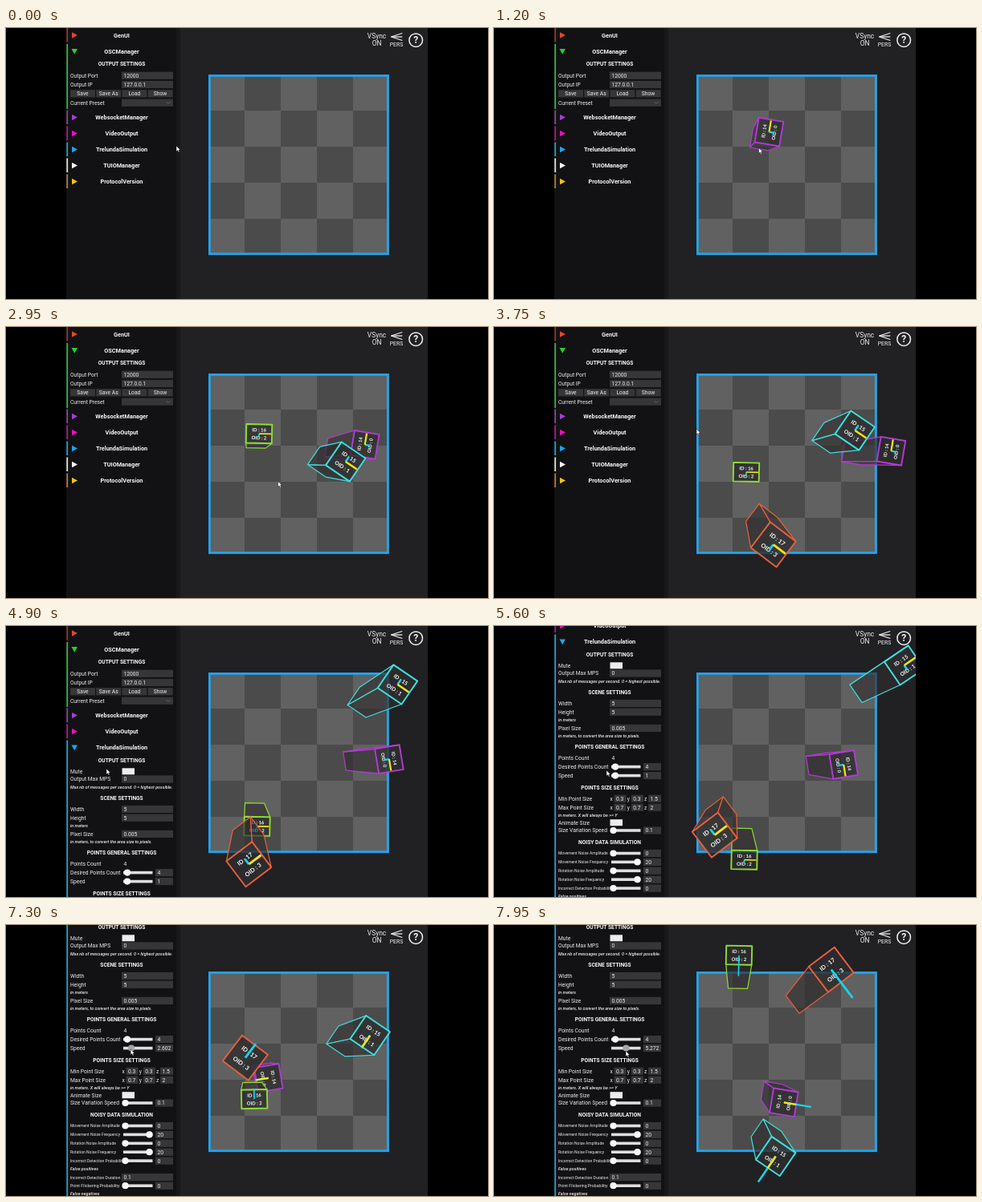
Animation of 600 by 338 pixels, one loop 8000 ms. Source, as an HTML page with a canvas:

```html
<!DOCTYPE html>
<html lang="en">
<head>
<meta charset="utf-8">
<title>Point simulation</title>
<style>
html, body { margin: 0; width: 100%; height: 100%; overflow: hidden; background: #000; }
canvas { display: block; width: 600px; height: 338px; }
</style>
</head>
<body>
<canvas id="stage" width="600" height="338"></canvas>
<script>
const ctx = document.getElementById('stage').getContext('2d');
const LOOP = 8000, STEP = 50;
const EYE = { x: 300, y: 169 };
const BOARD = { left: 252, top: 59.3, right: 477, bottom: 283 };
const OPEN_AT = 4400, GRAB_AT = 7.05;
const DRAG = { start: 7.15, length: 0.4, gain: 4.272 };
const SCROLLS = [5100, 5200, 5300, 5400, 5750], NOTCH = 33;
const UI = 'Roboto, sans-serif';

// x, y: ground position at time `at` (s); lift: perspective scale of the top face
const boxes = [
  { id: 14, oid: 0, color: '#b23bd2', born: 1000, at: 2.05, x: 370, y: 145.7, vx: 44.8, vy: 7.4, w: 31, h: 31, lift: 1.33, turns: true },
  { id: 15, oid: 1, color: '#3fe0dc', born: 1800, at: 2.05, x: 371.5, y: 202, vx: 25.5, vy: -37.5, w: 36, h: 35, lift: 1.3, turns: true },
  { id: 16, oid: 2, color: '#8fdc35', born: 2570, at: 3.75, x: 310.5, y: 178, vx: -1, vy: 45, w: 32, h: 23.5, lift: 1.33 },
  { id: 17, oid: 3, color: '#e9603c', born: 3150, at: 3.75, x: 332.9, y: 239.6, vx: -27.2, vy: 36, w: 40, h: 40, lift: 1.45 }
];

// time, x, y of the pointer tip
const pointerKeys = [
  [0, 212, 147], [50, 212, 147], [550, 323, 138], [1000, 323, 138], [1800, 365, 211],
  [2050, 340, 183], [2570, 311, 125], [3150, 349, 218], [3750, 252, 127], [4250, 86, 151],
  [4400, 86, 151], [4900, 125, 178], [5600, 140, 180], [6550, 170, 162], [7050, 151, 154],
  [7150, 151, 154], [7550, 164, 157], [8000, 164, 157]
];

const clamp = v => Math.max(0, Math.min(1, v));
const dragPhase = s => clamp((s - DRAG.start) / DRAG.length);
const speedAt = s => 1 + DRAG.gain * dragPhase(s);

function travelTime(s) {
  const u = dragPhase(s);
  const after = Math.max(0, s - DRAG.start - DRAG.length);
  return s + DRAG.gain * (DRAG.length * u * u / 2 + after);
}

function bounce(value, lo, hi) {
  const span = hi - lo, period = 2 * span;
  const m = ((value - lo) % period + period) % period;
  return m < span ? [lo + m, 1] : [lo + period - m, -1];
}

function pointerAt(t) {
  const i = pointerKeys.findIndex(k => k[0] > t);
  const [t0, x0, y0] = pointerKeys[i - 1], [t1, x1, y1] = pointerKeys[i];
  const u = (t - t0) / (t1 - t0), e = u * u * (3 - 2 * u);
  return [x0 + (x1 - x0) * e, y0 + (y1 - y0) * e];
}

function rect(x, y, w, h, color) {
  ctx.fillStyle = color;
  ctx.fillRect(x, y, w, h);
}

function line(x0, y0, x1, y1, color, width) {
  ctx.strokeStyle = color;
  ctx.lineWidth = width;
  ctx.beginPath();
  ctx.moveTo(x0, y0);
  ctx.lineTo(x1, y1);
  ctx.stroke();
}

function polygon(points) {
  ctx.beginPath();
  points.forEach(([x, y]) => ctx.lineTo(x, y));
  ctx.closePath();
}

function face(points, fill, stroke, width) {
  polygon(points);
  ctx.fillStyle = fill;
  ctx.fill();
  ctx.strokeStyle = stroke;
  ctx.lineWidth = width;
  ctx.stroke();
}

function disc(x, y, r, color) {
  ctx.fillStyle = color;
  ctx.beginPath();
  ctx.arc(x, y, r, 0, 7);
  ctx.fill();
}

function text(str, x, y, font, align = 'left', color = '#efefef') {
  ctx.font = font;
  ctx.textAlign = align;
  ctx.textBaseline = 'middle';
  ctx.fillStyle = color;
  ctx.fillText(str, x, y + 0.5);
}

function drawBoard() {
  for (let i = 0; i < 25; i++) {
    rect(252 + (i % 5) * 45, 58 + Math.floor(i / 5) * 45, 45, 45, i % 2 ? '#4b4b4b' : '#616161');
  }
  ctx.strokeStyle = '#1ea5f0';
  ctx.lineWidth = 2.8;
  ctx.strokeRect(253.4, 59.5, 221.9, 222.2);
}

function drawBox(b, s) {
  const run = travelTime(s) - b.at;
  const insetX = b.w / 2 / b.lift, insetY = b.h / 2 / b.lift;
  const [gx, sx] = bounce(b.x + b.vx * run, BOARD.left + insetX, BOARD.right - insetX);
  const [gy, sy] = bounce(b.y + b.vy * run, BOARD.top + insetY, BOARD.bottom - insetY);
  const cx = EYE.x + (gx - EYE.x) * b.lift, cy = EYE.y + (gy - EYE.y) * b.lift;
  const heading = Math.atan2(b.vy * sy, b.vx * sx);
  const forward = heading > 0 ? 1 : -1;
  const angle = heading - forward * Math.PI / 2;
  const cos = Math.cos(angle), sin = Math.sin(angle);

  const top = [[-1, -1], [1, -1], [1, 1], [-1, 1]].map(([u, v]) => {
    const x = u * b.w / 2, y = v * b.h / 2;
    return [cx + x * cos - y * sin, cy + x * sin + y * cos];
  });
  const base = top.map(([x, y]) => [EYE.x + (x - EYE.x) / b.lift, EYE.y + (y - EYE.y) / b.lift]);

  ctx.lineJoin = 'round';
  top.forEach((p, i) => {
    const j = (i + 1) % 4, q = top[j];
    const side = (q[0] - p[0]) * (EYE.y - p[1]) - (q[1] - p[1]) * (EYE.x - p[0]);
    if (side < 0) face([p, q, base[j], base[i]], 'rgba(48,45,46,.65)', b.color, 1.2);
  });
  face(top, 'rgba(45,45,47,.8)', b.color, 1.9);

  const speed = speedAt(s), fast = speed > 1;
  const reach = b.h * 0.21 * speed, thick = b.h / 14;
  const font = `bold ${b.w * 0.185}px Lato, sans-serif`;
  ctx.save();
  ctx.translate(cx, cy);
  ctx.rotate(angle);
  text(`ID : ${b.id}`, 0, -b.h * 0.21, font, 'center', '#fff');
  text(`OID : ${b.oid}`, 0, b.h * 0.21, font, 'center', '#fff');
  line(0, 0, 0, forward * reach, '#19d3ee', thick);
  if (!fast) line(0, 0, b.w / 2 - 1, 0, '#f5e414', thick);
  else if (b.turns) line(0, 0, 0, forward * b.w / 2, '#f5e414', thick);
  ctx.restore();
}

function drawCorner() {
  text('VSync', 461.5, 10.5, `8.4px ${UI}`, 'center');
  text('ON', 461.5, 19, `8.4px ${UI}`, 'center');
  text('PERS', 486, 20, `6.9px ${UI}`, 'center');
  for (const y of [6.5, 11, 15.5]) line(479.5, 11, 493.3, y, '#efefef', 1.3);
  ctx.strokeStyle = '#efefef';
  ctx.lineWidth = 1.5;
  ctx.beginPath();
  ctx.arc(510.2, 15.2, 8.3, 0, 7);
  ctx.stroke();
  text('?', 510.2, 15.2, `bold 12px ${UI}`, 'center');
}

const label = (str, y, size = 6.7) => text(str, 80, y, `${size}px ${UI}`);
const title = (str, y) => text(str, 144, y, `bold 6.6px ${UI}`, 'center', '#f8f8f8');
const note = (str, y) => text(str, 80, y, `italic 500 5.4px ${UI}`);

function field(value, x, y, w) {
  rect(x, y - 4.6, w, 9.2, '#363638');
  text(value, x + 2.5, y, `6.7px ${UI}`);
}

function inputRow(name, value, y) {
  label(name, y);
  field(value, 144, y, 64);
}

function toggleRow(name, y) {
  label(name, y);
  rect(144.5, y - 4, 15.5, 8, '#ececec');
}

function sliderRow(name, value, knob, y, size, knobColor = '#f8f8f8') {
  label(name, y, size);
  rect(146, y - 1.8, 36.5, 3.6, '#dedede');
  disc(knob, y, 4.1, knobColor);
  field(value, 186, y, 22);
}

function axisRow(name, values, y) {
  label(name, y);
  values.forEach((v, i) => {
    text('xyz'[i], 144.5 + i * 21.3, y, `6.7px ${UI}`);
    field(v, 149.5 + i * 21.3, y, i < 2 ? 15 : 16);
  });
}

function header(name, y, color, barColor, open, bottom = y + 8.5) {
  rect(75.3, y - 9, 1.8, bottom - y + 9, barColor);
  polygon(open ? [[81.5, y - 3], [89, y - 3], [85.2, y + 3.7]] : [[82, y - 3.7], [89, y], [82, y + 3.7]]);
  ctx.fillStyle = color;
  ctx.fill();
  text(name, 144, y, `bold 7.3px ${UI}`, 'center', '#f8f8f8');
}

function drawOutput() {
  title('OUTPUT SETTINGS', 45);
  inputRow('Output Port', '12000', 59.3);
  inputRow('Output IP', '127.0.0.1', 70.5);
  ['Save', 'Save As', 'Load', 'Show'].forEach((name, i) => {
    rect(80 + i * 32.2, 77.2, 31, 9.2, '#363638');
    text(name, 95.5 + i * 32.2, 81.7, `6.7px ${UI}`, 'center');
  });
  inputRow('Current Preset', '', 93.2);
  ctx.strokeStyle = '#68686a';
  ctx.lineWidth = 0.9;
  ctx.beginPath();
  ctx.moveTo(199.5, 92);
  ctx.lineTo(202, 94.5);
  ctx.lineTo(204.5, 92);
  ctx.stroke();
}

function drawSimulation(s) {
  const speed = speedAt(s);
  title('OUTPUT SETTINGS', 168);
  toggleRow('Mute', 181.3);
  inputRow('Output Max MPS', '0', 191);
  note('Max nb of messages per second. 0 = highest possible.', 201);
  title('SCENE SETTINGS', 214.5);
  inputRow('Width', '5', 228.5);
  inputRow('Height', '5', 239.2);
  note('in meters', 249);
  inputRow('Pixel Size', '0.005', 259.4);
  note('in meters, to convert the area size to pixels.', 269.3);
  title('POINTS GENERAL SETTINGS', 282.5);
  label('Points Count', 296.6);
  text('4', 146.5, 296.6, `6.7px ${UI}`);
  sliderRow('Desired Points Count', '4', 151, 307.6);
  sliderRow('Speed', String(+speed.toFixed(3)), 151 + (speed - 1) * 3.15, 318.6, 6.7, s < GRAB_AT ? '#f8f8f8' : '#a6a6a6');
  title('POINTS SIZE SETTINGS', 333.2);
  axisRow('Min Point Size', ['0.3', '0.3', '1.5'], 347.3);
  axisRow('Max Point Size', ['0.7', '0.7', '2'], 358.2);
  note('in meters. X will always be >= Y', 368);
  toggleRow('Animate Size', 377.2);
  sliderRow('Size Variation Speed', '0.1', 148.5, 387);
  title('NOISY DATA SIMULATION', 401.4);
  const noise = [['Movement Noise Amplitude', 0], ['Movement Noise Frequency', 20],
    ['Rotation Noise Amplitude', 0], ['Rotation Noise Frequency', 20], ['Incorrect Detection Probability', 0]];
  noise.forEach(([name, v], i) => sliderRow(name, String(v), v ? 178.5 : 148.5, 415.5 + i * 10.9, 5));
  note('False positives', 469.3);
  label('Incorrect Detection Duration', 479.6, 5);
  field('0.1', 144, 479.6, 64);
  sliderRow('Point Flickering Probability', '0', 148.5, 490.2, 5.2);
  note('False negatives', 500.4);
}

function drawPanel(t) {
  const open = t >= OPEN_AT;
  rect(75, 0, 137, 338, '#121214');
  rect(212, 0, 5, 338, '#19191b');
  ctx.save();
  ctx.translate(0, -NOTCH * SCROLLS.filter(at => t >= at).length);
  header('GenUI', 9, '#e8452c', '#8c3a2c');
  header('OSCManager', 29, '#22d321', '#3fae48', true, 101);
  drawOutput();
  header('WebsocketManager', 111.5, '#a23fd6', '#84489c');
  header('VideoOutput', 131.5, '#f00cc0', '#a81c8c');
  header('TrelundaSimulation', 151.5, '#16a8f2', '#2c9cc8', open, open ? 600 : 160);
  if (open) {
    drawSimulation(t / 1000);
  } else {
    header('TUIOManager', 171.5, '#ffffff', '#e2e2d8');
    header('ProtocolVersion', 191.5, '#f3c40c', '#b97a3c');
  }
  ctx.restore();
}

function drawPointer(t) {
  const [x, y] = pointerAt(t);
  const arrow = [[0, 0], [0, 7], [1.6, 5.6], [2.8, 8], [4, 7.4], [2.9, 5.1], [5, 5]];
  face(arrow.map(([u, v]) => [x + u, y + v]), '#fff', '#111', 0.5);
}

function draw(t) {
  rect(0, 0, 600, 338, '#000');
  ctx.save();
  ctx.beginPath();
  ctx.rect(75, 0, 450, 338);
  ctx.clip();
  rect(75, 0, 450, 338, '#212023');
  drawBoard();
  boxes.filter(b => t >= b.born).forEach(b => drawBox(b, t / 1000));
  drawCorner();
  drawPanel(t);
  drawPointer(t);
  ctx.restore();
}

const start = performance.now();
function tick() {
  const t = (performance.now() - start) % LOOP;
  draw(Math.floor(t / STEP) * STEP);
  requestAnimationFrame(tick);
}
tick();
</script>
</body>
</html>
```
